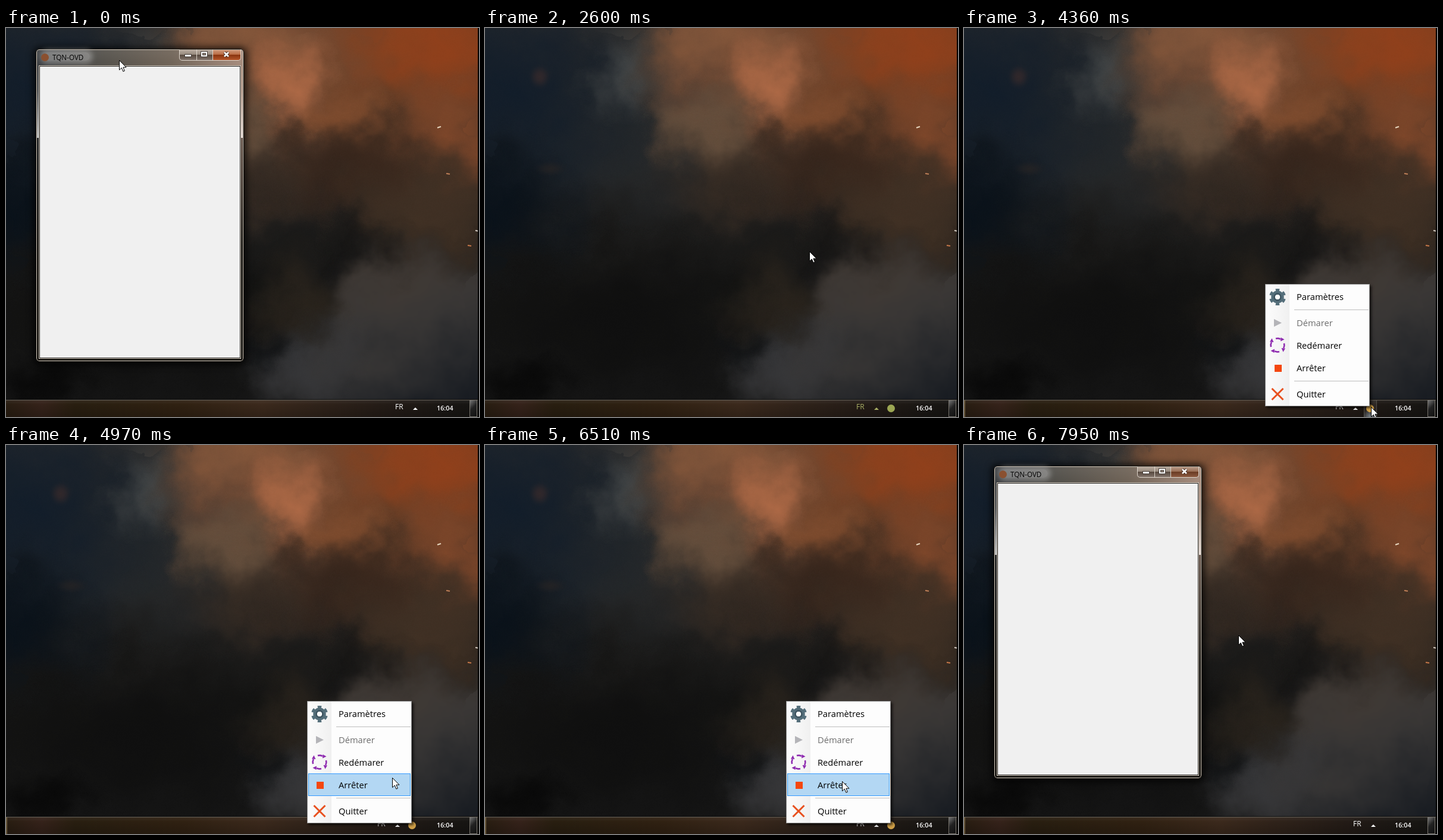
An HTML page with a canvas for the animation above (8 s loop, 795 px wide and 655 px high).

```html
<!DOCTYPE html>
<html lang="fr">
<head>
<meta charset="utf-8">
<title>Zone de notification</title>
<style>
html, body { margin: 0; width: 100%; height: 100%; overflow: hidden; background: #000; }
body { position: relative; font-family: "Open Sans", "Noto Sans", sans-serif; }
body *, canvas { position: absolute; box-sizing: border-box; }
svg { left: 0; top: 0; overflow: visible; }
svg * { position: static; }

#win {
  left: 50px; top: 35px; width: 350px; height: 527px; border-radius: 6px;
  border: 1px solid #15130f; box-shadow: inset 0 0 0 1px #cfc6ba, 0 1px 12px 4px #000b;
  background:
    linear-gradient(#fff2, #fff1 26px, #fff2 70px, #fffa 149px, #0000 149px),
    linear-gradient(#0000 149px, #0006 149px, #15130f 330px),
    linear-gradient(90deg, #303336, #4a463f 35%, #65584b 65%, #a08474);
}
#glow { left: 12px; top: 5px; width: 78px; height: 14px; border-radius: 8px; background: #bbb7; box-shadow: 0 0 8px 5px #bbb7; }
#logo { left: 8px; top: 7px; width: 13px; height: 13px; border-radius: 50%; background: #8a5030; }
#name { left: 27px; top: 3px; font-size: 11.7px; line-height: 20px; color: #000; }
#client { left: 4px; top: 27px; width: 340px; height: 494px; border: 1px solid #d5cdc2; background: #f0f0f0; box-shadow: inset 0 0 0 1px #22201d; }
.btn {
  top: 0; height: 19px; border: 1px solid #ddd5cb; border-top-color: #a89c90;
  background: linear-gradient(#b9aca0, #93867a 48%, #57493f 50%, #81736a);
}
#min { left: 240px; width: 30px; border-radius: 0 0 0 5px; }
#max { left: 269px; width: 28px; }
#close { left: 296px; width: 48px; border-radius: 0 0 5px 0; }

#bar {
  left: 0; top: 625px; width: 793px; height: 30px;
  border-top: 1px solid #0b0a09; box-shadow: inset 0 1px #67625a;
  background: linear-gradient(#fff1, #0000 8px, #0003),
    linear-gradient(90deg, #281d11, #35221a 60px, #281e10 115px, #302112 300px, #3b291c 430px, #30231a 520px, #231b16 640px, #151412);
}
#start { left: 0; top: 627px; width: 3px; height: 28px; background: linear-gradient(90deg, #b8a070aa, #a8803000); }
#show { left: 779px; top: 626px; width: 13px; height: 29px; border: 1px solid #77736c; background: linear-gradient(135deg, #777, #222 45%, #111); }
#lang, #clock { line-height: 16px; color: #fff; }
#lang { top: 630px; font-size: 12px; }
#clock { left: 724px; top: 632px; font-size: 10.8px; font-weight: 600; }
#arrow { top: 639px; border: solid transparent; border-width: 0 4px 4px; border-bottom-color: currentColor; }
#tray { left: 676px; top: 634px; width: 13px; height: 13px; border-radius: 50%; }
#hot { left: 672px; top: 627px; width: 22px; height: 28px; border: solid #8a867c66; border-width: 0 1px; background: radial-gradient(circle at 50% 100%, #b8ccdd99, #fff1 45%); }

#menu {
  left: 506px; top: 431px; width: 176px; height: 206px; border: 1px solid #8d8d8d;
  background: linear-gradient(90deg, #fcfcfc, #f0f0f0 40px, #fdfdfd 40px);
  box-shadow: 3px 3px 4px #000a;
}
.item { left: 1px; width: 172px; height: 38px; border: 1px solid transparent; padding-left: 50px; font-size: 14.7px; line-height: 37px; color: #000; white-space: pre; }
.item.off { color: #6d6d6d; }
.item.on { border-color: #3399ff; }
.item.on:not(.off) { background: #b3d7f3; }
.line { left: 48px; width: 125px; height: 1px; background: #bdbdbd; }
</style>
</head>
<body>
<svg width="0" height="0">
  <filter id="billow" x="0" y="0" width="1" height="1" color-interpolation-filters="sRGB">
    <feTurbulence type="fractalNoise" baseFrequency=".011" numOctaves="5" seed="4" result="noise"/>
    <feDisplacementMap in="SourceGraphic" in2="noise" scale="110" xChannelSelector="R" yChannelSelector="G"/>
  </filter>
</svg>
<canvas id="sky" width="793" height="655"></canvas>

<div id="win">
  <div id="glow"></div><div id="logo"></div><div id="name">TQN-OVD</div>
  <div id="min" class="btn"></div><div id="max" class="btn"></div><div id="close" class="btn"></div>
  <svg width="350" height="30" fill="none" stroke="#fff">
    <rect x="249.5" y="8.5" width="11" height="4" fill="#fff" stroke="#49413c"/>
    <rect x="278" y="5" width="8" height="6" stroke="#49413c" stroke-width="4"/>
    <rect x="278" y="5" width="8" height="6" stroke-width="2"/>
    <path d="M316 5l7 7m0-7l-7 7" stroke="#4a2d22" stroke-width="5"/>
    <path d="M316 5l7 7m0-7l-7 7" stroke-width="2.8"/>
  </svg>
  <div id="client"></div>
</div>

<div id="bar"></div><div id="start"></div><div id="show"></div>
<div id="hot"></div>
<div id="lang">FR</div><div id="arrow"></div><div id="tray"></div><div id="clock">16:04</div>

<div id="menu">
  <div class="line" style="top:42px"></div><div class="line" style="top:162px"></div>
  <svg id="icons" width="174" height="204" fill="none">
    <g transform="translate(20 21)">
      <circle r="7.5" stroke="#546e7a" stroke-width="6.5"/>
      <circle r="11.6" stroke="#546e7a" stroke-width="5" pathLength="12" stroke-dasharray="1" stroke-dashoffset="-.5"/>
      <circle r="5.5" stroke="#3f5561" stroke-width="2.5"/>
      <circle r="4" fill="#fff"/>
    </g>
    <path d="M14 58l13 6.500l-13 6.500z" fill="#b4b4b8"/>
    <g id="cycle" transform="translate(20 102)"></g>
    <path d="M15 135h12v12h-12z" fill="#f4470f"/>
    <path d="M10.500 175l19 19m0-19l-19 19" stroke="#e8501e" stroke-width="3"/>
  </svg>
</div>

<svg id="cursor" width="13" height="21"><path d="M.5 .5V16.700L4.300 13.100L6.900 19.200L9.400 18.100L6.900 12.200H12Z" fill="#fff" stroke="#000"/></svg>

<script>
const $ = id => document.getElementById(id);

function paintSky() {
  const c = $('sky').getContext('2d');
  const base = c.createLinearGradient(0, 0, 0, 655);
  [[0, '#2b2b2b'], [.4, '#1f1e1d'], [.7, '#141413'], [1, '#151515']].forEach(s => base.addColorStop(...s));
  c.fillStyle = base;
  c.fillRect(0, 0, 793, 655);

  const blob = (x, y, rx, ry, color) => {
    c.setTransform(rx, 0, 0, ry, x, y);
    const g = c.createRadialGradient(0, 0, 0, 0, 0, 1);
    [[0, 'cc'], [.3, 'a4'], [.6, '50'], [.8, '18'], [1, '00']].forEach(([p, a]) => g.addColorStop(p, '#' + color + a));
    c.fillStyle = g;
    c.fillRect(-1, -1, 2, 2);
    c.setTransform(1, 0, 0, 1, 0, 0);
  };

  // Night side, then fire, then the dark gap: centre, radii, colour.
  [
    [250, 200, 280, 190, '25292c'], [30, 110, 270, 240, '0d1b2b'], [0, 310, 230, 150, '050f19'],
    [235, 75, 80, 100, '484c4d'], [310, 60, 110, 140, '3f3b37'],
    [650, 30, 440, 320, '804826'], [450, 60, 210, 220, '805238'], [390, 10, 130, 90, '8a5a3c'],
    [730, 20, 230, 150, '9a4018'], [475, 100, 85, 100, 'bb704a'], [375, 180, 100, 100, '705843'],
    [570, 140, 90, 60, '88502f'], [750, 180, 120, 120, '8a4b2b'], [420, 250, 180, 110, '382c23'],
    [580, 240, 160, 120, '36241a'], [720, 310, 220, 130, '483526'], [595, 385, 90, 80, '131313']
  ].forEach(b => blob(...b));

  const smoke = c.createLinearGradient(640, 390, 740, 640);
  smoke.addColorStop(0, '#433b35');
  smoke.addColorStop(.45, '#383635');
  smoke.addColorStop(1, '#171b21');
  c.filter = 'blur(22px)';
  c.fillStyle = smoke;
  c.fill(new Path2D('M430 700L480 570L535 495L590 425Q635 375 700 372L850 395V700Z'));
  c.filter = 'none';

  [
    [490, 460, 110, 110, '30281f'], [500, 560, 110, 100, '36373a'],
    [440, 540, 70, 45, '111315'], [210, 500, 330, 170, '0e0e0e'], [60, 600, 100, 60, '060606']
  ].forEach(b => blob(...b));

  c.filter = 'url(#billow)';
  c.drawImage($('sky'), 0, 0);
  c.filter = 'none';
  blob(92, 82, 20, 22, '382a2b');
  blob(110, 237, 30, 14, '252324');

  c.lineWidth = 2;
  [[725, 167, '#e8d8c0'], [740, 245, '#c08058'], [776, 366, '#c87848'], [789, 341, '#d8d0c8']].forEach(([x, y, color], i) => {
    c.strokeStyle = color;
    c.beginPath();
    c.moveTo(x, y + (i ? 0 : 1));
    c.lineTo(x + 6, y + (i ? 1 : -1));
    c.stroke();
  });
}

const items = [['Paramètres', 1], ['Démarer', 45], ['Redémarer', 83], ['Arrêter', 121], ['Quitter', 165]].map(([text, top], i) => {
  const el = document.createElement('div');
  el.className = i === 1 ? 'item off' : 'item';
  el.textContent = text;
  el.style.top = top + 'px';
  $('menu').insertBefore(el, $('icons'));
  return { el, top: top + 432 };
});

$('cycle').innerHTML = [0, 90, 180, 270].map(a =>
  `<g transform="rotate(${a})"><path d="M-3 -11A11.400 11.400 0 0 1 5 -10.200" stroke="#8e2bb0" stroke-width="2.600"/>
   <path d="M5.500 -13L11.500 -9.500L5 -6.500Z" fill="#8e2bb0"/></g>`).join('');

// Pointer moves: start time, time per step, steps, end point.
const moves = [
  [770, 82, 4, 312, 34], [1098, 81, 3, 307, 44], [1400, 50, 2, 306, 47],
  [2080, 86, 7, 545, 376], [2680, 75, 3, 627, 491], [2900, 79, 11, 684, 630], [3770, 90, 2, 684, 638],
  [4760, 50, 2, 655, 580], [4970, 90, 6, 620, 458], [5710, 1, 1, 618, 479],
  [5790, 72, 10, 600, 566], [6590, 88, 6, 587, 455], [7650, 75, 5, 461, 320]
];

function pointer(t) {
  let x = 190, y = 54;
  for (const [start, step, count, toX, toY] of moves) {
    if (t < start) break;
    const p = Math.min(count, Math.floor((t - start) / step) + 1) / count;
    x += (toX - x) * p;
    y += (toY - y) * p;
  }
  return [Math.round(x), Math.round(y)];
}

const show = (id, on) => { $(id).style.visibility = on ? 'visible' : 'hidden'; };

function draw(t) {
  const within = (a, b) => t >= a && t < b;
  const [x, y] = pointer(t);
  const hidden = within(1890, 7300), docked = within(1890, 7220);
  const olive = '#aab066';

  $('cursor').style.transform = `translate(${x}px, ${y}px)`;
  show('win', !hidden);
  show('menu', within(4360, 7300));
  show('tray', docked);
  show('hot', within(3770, 4970));
  show('start', t >= 4110);

  $('lang').style.left = (docked ? 624 : 654) + 'px';
  $('lang').style.color = within(1890, 4360) ? olive : '#fff';
  $('arrow').style.left = (docked ? 654 : 684) + 'px';
  $('arrow').style.color = within(1890, 3290) ? olive : '#fff';
  $('tray').style.background = within(1890, 3290) ? '#9ca653' : '#d0a048';

  $('min').style.filter = within(1180, 1680) ? 'brightness(1.25)' : 'none';
  $('close').style.background = t < 7300
    ? 'linear-gradient(#d09a7c, #b8683f 48%, #8a3510 50%, #b4562a)'
    : 'linear-gradient(#b89c8a, #96694f 48%, #6a3c24 50%, #8c5a40)';

  for (const { el, top } of items)
    el.classList.toggle('on', within(4760, 7220) && y >= top && y < top + 38);
}

paintSky();
const begin = performance.now();
(function frame() {
  draw((performance.now() - begin) % 8000);
  requestAnimationFrame(frame);
})();
</script>
</body>
</html>
```
